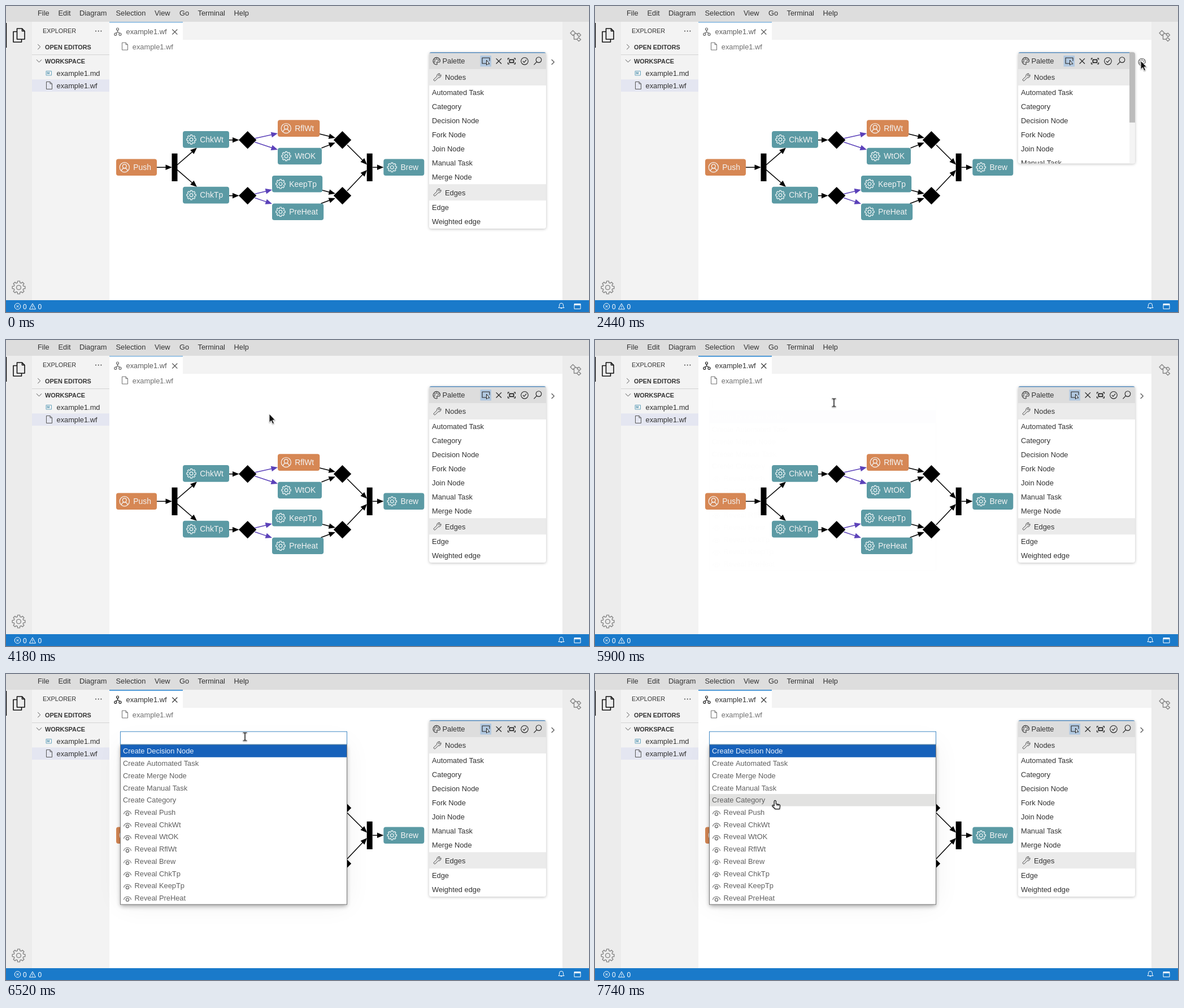
Animation, 1032 px wide and 543 px high, one loop 8 s. Source, as an HTML page with a canvas:

```html
<!DOCTYPE html>
<html lang="en">
<head>
<meta charset="utf-8">
<title>Workflow editor</title>
<style>
html, body { margin: 0; width: 100%; height: 100%; overflow: hidden; background: #fff; }
canvas { display: block; width: 100vw; height: 100vh; }
</style>
</head>
<body>
<canvas id="stage" width="1032" height="543"></canvas>
<script>
const W = 1032, H = 543, LOOP = 8000;
const stage = document.getElementById('stage');
const overlay = document.createElement('canvas');
overlay.width = W; overlay.height = H;
const screenCtx = stage.getContext('2d'), overlayCtx = overlay.getContext('2d');
let ctx = screenCtx;

const FONT = '"Liberation Sans", Arial, sans-serif';
const INK = '#333', TEAL = '#5b9aa4', ORANGE = '#d68754', PURPLE = '#5b41b9';

// ---------- drawing helpers ----------
function text(str, x, y, color = INK, size = 12.83, weight = '') {
  ctx.font = `${weight} ${size}px ${FONT}`;
  ctx.fillStyle = color;
  ctx.fillText(str, x, y + size * 0.355);
}
function rect(x, y, w, h, color) {
  ctx.fillStyle = color;
  ctx.fillRect(x, y, w, h);
}
function box(x, y, w, h, color, lw = 1) {
  ctx.strokeStyle = color; ctx.lineWidth = lw;
  ctx.strokeRect(x, y, w, h);
}
function icon(d, x, y, color, lw = 1, fill) {
  const path = new Path2D(d);
  ctx.save();
  ctx.translate(x, y);
  ctx.lineJoin = 'round';
  if (fill) { ctx.fillStyle = fill; ctx.fill(path); }
  if (lw) { ctx.strokeStyle = color; ctx.lineWidth = lw; ctx.stroke(path); }
  ctx.restore();
}
function circle(x, y, r, color, lw = 1, fill) {
  ctx.beginPath();
  ctx.arc(x, y, r, 0, Math.PI * 2);
  if (fill) { ctx.fillStyle = fill; ctx.fill(); }
  if (lw) { ctx.strokeStyle = color; ctx.lineWidth = lw; ctx.stroke(); }
}
function roundRect(x, y, w, h, r, color) {
  ctx.beginPath();
  ctx.roundRect(x, y, w, h, r);
  ctx.fillStyle = color;
  ctx.fill();
}
function gear(cx, cy, r, color, lw) {
  ctx.beginPath();
  for (let i = 0; i < 8; i++) {
    for (const [offset, k] of [[-.27, .76], [-.17, 1], [.17, 1], [.27, .76]]) {
      const a = i * Math.PI / 4 + offset;
      ctx.lineTo(cx + Math.cos(a) * r * k, cy + Math.sin(a) * r * k);
    }
  }
  ctx.closePath();
  ctx.strokeStyle = color; ctx.lineWidth = lw; ctx.lineJoin = 'round';
  ctx.stroke();
  circle(cx, cy, r * .34, color, lw);
}
function person(cx, cy, color) {
  circle(cx, cy, 8.6, color, 1.2);
  circle(cx, cy - 2, 3.4, color, 1.2);
  icon('M-5.4 6.4C-4.8 3-2.6 1.5 0 1.5S4.8 3 5.4 6.4', cx, cy, color, 1.2);
}
function arrow(x1, y1, x2, y2, color = '#000') {
  const a = Math.atan2(y2 - y1, x2 - x1);
  ctx.save();
  ctx.translate(x2, y2);
  ctx.rotate(a);
  ctx.strokeStyle = ctx.fillStyle = color;
  ctx.lineWidth = 1.5;
  ctx.beginPath();
  ctx.moveTo(-Math.hypot(x2 - x1, y2 - y1), 0);
  ctx.lineTo(-8, 0);
  ctx.stroke();
  ctx.beginPath();
  ctx.moveTo(0, 0); ctx.lineTo(-11.5, -4.8); ctx.lineTo(-11.5, 4.8);
  ctx.fill();
  ctx.restore();
}
const PAGE = 'M-5 -6.5H1.5L5 -3V6.5H-5ZM1.5 -6.5V-3H5';
const CHEVRON = 'M-2.3 -4.5L2.3 0L-2.3 4.5';
const CROSS = 'M-4.5 -4.5L4.5 4.5M4.5 -4.5L-4.5 4.5';
const WRENCH = 'M-6.2 3.6L-.6 -1.8A4 4 0 0 1 4.6 -6.4L2 -3.6L3.4 -2L6.2 -4.8A4 4 0 0 1 1.6 .6L-4 6.2A1.9 1.9 0 0 1 -6.2 3.6Z';

function paletteIcon(x, y, color) {
  icon('M0 6.3A6.3 6.3 0 1 1 6.5 -.5C6.5 2 4.5 2.4 2.5 1.8C.5 1.4 .2 2.8 1 4C1.6 5 1.2 6.3 0 6.3Z', x, y, color, 1.1);
  for (const [dx, dy] of [[-3.4, 1.4], [-2.8, -2.1], [.4, -3.7], [3.4, -1.6]])
    circle(x + dx, y + dy, 1, color, .8);
}

// ---------- workbench ----------
function drawWorkbench(active) {
  rect(0, 0, W, H, '#fff');
  rect(0, 28, 46, 494, '#ececec');
  rect(46, 28, 137, 494, '#f3f3f3');
  rect(183, 28, 802, 32, '#f3f3f3');
  rect(985, 28, 47, 494, '#ececec');
  rect(0, 0, W, 28, '#ddd');
  [['File', 56], ['Edit', 92.5], ['Diagram', 130], ['Selection', 194.5], ['View', 263],
   ['Go', 307], ['Terminal', 339.5], ['Help', 403.5]].forEach(([s, x]) => text(s, x, 12.8));

  rect(0, 30, 1.2, 44, '#000');
  icon('M-3 -12H6L10.5 -7.5V7H-3ZM6 -12V-7.5H10.5M-3 -6.5H-9.5V12H5V7', 22.5, 52, '#111', 1.6);
  gear(22.5, 499.5, 11.5, '#858585', 1.4);
  icon('M-9 -5L-4.5 -9.5L0 -5L-4.5 -.5ZM3 -2L6 -5L9.5 -1.5L6.5 1.5ZM2.5 6L5.5 3L9.5 6.5L6 9.5ZM-1 -4H4M-2.5 -2.5V6H2.5', 1008, 53, '#858585', 1.4);

  text('EXPLORER', 65, 44.5, INK, 10.86);
  for (const x of [159, 163.7, 168.4]) circle(x, 44.5, 1, '', 0, '#444');
  icon(CHEVRON, 58.5, 72.5, '#555');
  text('OPEN EDITORS', 69, 73, INK, 10.86, 'bold');
  rect(46, 86, 137, 1, '#d3d3d3');
  icon('M-4.5 -2.3L0 2.3L4.5 -2.3', 58.5, 97.5, '#555');
  text('WORKSPACE', 69, 98, INK, 10.86, 'bold');
  rect(46, 130.4, 137, 21.7, '#e4e6f1');
  box(71, 115.5, 9.5, 7.5, '#6ba6bf', 1);
  text('M', 72.2, 119.3, '#3f8aa9', 6, 'bold');
  text('example1.md', 89.5, 119);
  icon(PAGE, 76.5, 141, '#555');
  text('example1.wf', 89.5, 141);

  rect(183, 28, 130, 32, '#fff');
  rect(183, 28, 130, 1.6, active ? '#2583cf' : '#85b7e0');
  const tint = active ? '#222' : '#666';
  circle(197.5, 41, 2, tint, 1.2);
  circle(193.8, 50.2, 2, tint, 1.2);
  circle(202, 50.2, 2, tint, 1.2);
  icon('M0 -2.5V.5L-3 2.7M0 .5L3.6 2.7', 197.6, 45.5, tint, 1.2);
  text('example1.wf', 212.5, 45.3, active ? INK : '#5f5f5f');
  icon(CROSS, 298.8, 46, active ? '#333' : '#555', 1.1);
  icon(PAGE, 210.5, 71.5, '#707070');
  text('example1.wf', 223.8, 72, '#707070');

  rect(0, 522, W, 21, '#1a7aca');
  circle(20.5, 533, 5.3, '#fff');
  icon('M-2 -2L2 2M2 -2L-2 2', 20.5, 533, '#fff');
  text('0', 30, 533.3, '#fff', 12);
  icon('M0 -5L5.5 5H-5.5ZM0 -1.5V1.8M0 2.8V4', 47, 533, '#fff');
  text('0', 56.5, 533.3, '#fff', 12);
  icon('M-5 3.2L-3.5 1V-1.5A3.5 3.5 0 0 1 3.5 -1.5V1L5 3.2ZM-1.3 3.6A1.4 1.4 0 0 0 1.3 3.6', 983, 532.3, '#fff');
  box(1006, 528.5, 11, 9, '#fff');
  rect(1006, 528.5, 11, 2.6, '#fff');
}

// ---------- diagram ----------
const NODES = [
  ['Push', 195, 271.5, 72, true], ['ChkWt', 313, 222.1, 82], ['ChkTp', 313, 320.8, 82],
  ['RflWt', 481, 202.3, 74.3, true], ['WtOK', 481, 251.7, 78], ['KeepTp', 471, 301, 89.2],
  ['PreHeat', 471, 350.4, 91.2], ['Brew', 668.3, 271.5, 72]
];
function drawDiagram() {
  arrow(267, 286.3, 294, 286.3);
  arrow(303, 282, 338, 251.6);
  arrow(303, 290.6, 338, 321);
  for (const y of [237.8, 336.6]) {
    arrow(395, y, 412.5, y);
    icon('M0 -15.7L15.7 0L0 15.7L-15.7 0Z', 427.7, y, '', 0, '#000');
    icon('M0 -15.7L15.7 0L0 15.7L-15.7 0Z', 595.5, y, '', 0, '#000');
  }
  arrow(440.5, 235, 481, 226, PURPLE);
  arrow(440.5, 241.5, 481, 255, PURPLE);
  arrow(440.5, 333.5, 471, 326, PURPLE);
  arrow(440.5, 340.5, 471, 351, PURPLE);
  arrow(555, 227, 583, 234);
  arrow(558.5, 252, 583, 242.5);
  arrow(560, 327, 583, 333);
  arrow(557.5, 350.5, 583, 341);
  arrow(604, 246.5, 639, 281.5);
  arrow(604, 328, 639, 291);
  arrow(649, 286.3, 668.5, 286.3);
  rect(293.5, 261.7, 10, 49.3, '#000');
  rect(638.7, 261.7, 10, 49.3, '#000');
  for (const [label, x, y, w, manual] of NODES) {
    roundRect(x, y, w, 29.6, 4, manual ? ORANGE : TEAL);
    if (manual) person(x + 14.8, y + 14.8, '#f5f5f5');
    else gear(x + 15, y + 14.8, 8.3, '#f0f6f7', 1.2);
    text(label, x + 30.2, y + 14.6, '#f3f3f3', 13.9);
  }
}

// ---------- tool palette ----------
const FULL = 313;
const ITEMS = ['Automated Task', 'Category', 'Decision Node', 'Fork Node', 'Join Node', 'Manual Task', 'Merge Node'];

function drawPalette(height, pointer) {
  if (height <= 0.5) return;
  const scrolling = height < FULL, right = scrolling ? 946 : 956, w = right - 749;
  ctx.save();
  ctx.shadowColor = 'rgba(0,0,0,.25)';
  ctx.shadowBlur = 5;
  ctx.shadowOffsetY = 1;
  roundRect(749, 82, 207, height, 4, '#fff');
  ctx.restore();
  ctx.save();
  ctx.beginPath();
  ctx.roundRect(749, 82, 207, height, 4);
  ctx.clip();
  rect(749, 82, w, 30, '#ddd');
  rect(749, 82, w, 1.4, '#4d88bd');
  paletteIcon(762, 97.7, '#333');
  text('Palette', 772.5, 97.8);

  const x = right - 956;
  rect(x + 839.5, 88, 19.5, 19.5, '#b1c8e0');
  icon('M1 4.5H-6.5V-5.5H6.5V0', x + 849.5, 97.5, '#222', 1.1);
  icon('M0 -1.5V7.5L2.2 5.3H5.5Z', x + 850.5, 97.5, '#222', 1, '#dce6f0');
  icon('M-4.7 -4.7L4.7 4.7M4.7 -4.7L-4.7 4.7', x + 872.3, 97.8, '#222', 1.2);
  icon('M-6.5 -2.2V-5H-4M4 -5H6.5V-2.2M6.5 2.2V5H4M-4 5H-6.5V2.2', x + 895, 97.8, '#222', 1.2);
  box(x + 891.4, 95.3, 7.2, 5, '#222', 1.7);
  circle(x + 918, 97.8, 6.3, '#222', 1.1);
  icon('M-3 .2L-.8 2.4L3.2 -2.4', x + 918, 97.8, '#222', 1.1);
  circle(x + 943, 95.6, 4.8, '#222', 1.1);
  icon('M-3.5 3.5L-8.5 8.7', x + 943, 95.6, '#222', 1.2);

  [['Nodes', 112], ['Edges', 316.2]].forEach(([label, y]) => {
    rect(749, y, w, 29, '#ebebeb');
    icon(WRENCH, 763.5, y + 14.6, '#444');
    text(label, 777, y + 14.8);
  });
  const row = (label, y) => {
    if (pointer && Math.abs(pointer.y - y) < 12.5 && pointer.x > 749 && pointer.x < right)
      rect(749, y - 12.5, w, 25, '#e4e4e4');
    text(label, 754, y);
  };
  ITEMS.forEach((label, i) => row(label, 153.5 + i * 25.05));
  row('Edge', 357.3);
  row('Weighted edge', 382.6);
  if (scrolling) {
    rect(946, 82, 10, height, '#f4f4f4');
    rect(946, 82, 10, height * height / FULL, '#bcbcbc');
  }
  ctx.restore();
}

// ---------- command palette ----------
const COMMANDS = ['Decision Node', 'Automated Task', 'Merge Node', 'Manual Task', 'Category'].map(s => 'Create ' + s);
const TARGETS = ['Push', 'ChkWt', 'WtOK', 'RflWt', 'Brew', 'ChkTp', 'KeepTp', 'PreHeat'].map(s => 'Reveal ' + s);
const ROW = 21.72, LIST_TOP = 126;

function drawCommands(pointer, caret) {
  ctx.clearRect(0, 0, W, H);
  ctx.save();
  ctx.shadowColor = 'rgba(0,0,0,.06)';
  ctx.shadowBlur = 45;
  rect(203, 125, 400, 284, '#fff');
  ctx.shadowColor = 'rgba(0,0,0,.35)';
  ctx.shadowBlur = 8;
  ctx.shadowOffsetY = 3;
  rect(203, 125, 400, 284, '#fff');
  ctx.restore();
  rect(202, 101.5, 402, 24, '#fff');
  const hovered = pointer.y > LIST_TOP ? Math.floor((pointer.y - LIST_TOP) / ROW) : -1;
  [...COMMANDS, ...TARGETS].forEach((label, i) => {
    const y = LIST_TOP + i * ROW, reveal = i >= COMMANDS.length;
    if (i === 0) rect(203, y, 400, ROW, '#1661ba');
    else if (i === hovered) rect(203, y, 400, ROW, '#e2e2e1');
    text(label, reveal ? 227.5 : 207, y + 10.9, i ? '#606060' : '#e6eefa');
    if (reveal) {
      icon('M-6.5 3.5A6.6 6.6 0 0 1 6.5 3.5', 215, y + 10.5, '#555', 1.1);
      circle(215, y + 14, 2.6, '#555', 1.1);
    }
  });
  box(202.5, 125.5, 401, 283.5, '#777');
  box(202.5, 102.2, 401, 22.8, '#4189c4');
  if (caret) rect(207, 107, 1, 14, '#333');
}

// ---------- pointer ----------
const PATH = [
  [400, 56, 486], [680, 620, 270], [920, 980, 93], [1160, 896, 131], [1260, 896, 131],
  [1480, 892, 154], [1860, 966, 97], [3860, 966, 97], [4180, 466, 131], [4380, 434, 122],
  [4520, 434, 122], [4820, 423, 111], [6860, 423, 111], [7480, 319, 225], [LOOP, 319, 225]
];
function pointerAt(t) {
  if (t < PATH[0][0]) return null;
  const i = PATH.findIndex(p => p[0] > t);
  const [t0, x0, y0] = PATH[i - 1], [t1, x1, y1] = PATH[i];
  const u = (t - t0) / (t1 - t0), k = u * u * (3 - 2 * u);
  return { x: x0 + (x1 - x0) * k, y: y0 + (y1 - y0) * k };
}
function drawPointer({ x, y }, t) {
  ctx.save();
  ctx.shadowColor = 'rgba(0,0,0,.3)';
  ctx.shadowBlur = 2;
  ctx.shadowOffsetY = 1;
  if (t < 5900) {
    icon('M0 0V15.5L3.5 12.2L6 18L8.6 16.9L6.1 11.2H10.6Z', x, y, '#fff', 1, '#111');
  } else if (y < LIST_TOP) {
    const beam = 'M-3.5 -7H-1.2L0 -6L1.2 -7H3.5M0 -6V6M-3.5 7H-1.2L0 6L1.2 7H3.5';
    icon(beam, x, y, '#fff', 2.6);
    icon(beam, x, y, '#111', 1.2);
  } else {
    icon('M-1.8 9V1A1.6 1.6 0 0 1 1.4 1V5.5L7 6.6Q8.8 7 8.6 9L7.8 14.5H.2L-5 9.5Q-5.6 7.4 -3.5 7.6ZM3.2 6V8.5M5.8 6.6V8.8',
      x, y, '#111', 1.1, '#fff');
  }
  ctx.restore();
}

// ---------- timing ----------
const bezier = (a, b, s) => 3 * (1 - s) * (1 - s) * s * a + 3 * (1 - s) * s * s * b + s * s * s;
function ease(u) {
  if (u <= 0) return 0;
  if (u >= 1) return 1;
  let lo = 0, hi = 1;
  for (let i = 0; i < 20; i++) {
    const mid = (lo + hi) / 2;
    if (bezier(.25, .25, mid) < u) lo = mid; else hi = mid;
  }
  return bezier(.1, 1, lo);
}
function paletteHeight(t) {
  const limit = t < 3300 ? 500 * (1 - ease((t - 2371) / 200)) : 500 * ease((t - 3310) / 200);
  return Math.min(FULL, limit);
}

function draw(t) {
  const pointer = pointerAt(t);
  drawWorkbench(t >= 4600);
  drawDiagram();
  if (t >= 2360 && t < 3300) paletteIcon(968, 99.5, '#555');
  else icon(CHEVRON, 968, 99.5, '#555', 1.2);
  drawPalette(paletteHeight(t), pointer);
  if (t > 5900) {
    const caret = t < 6520 || (t >= 7130 && t < 7740);
    ctx = overlayCtx;
    drawCommands(pointer, caret);
    ctx = screenCtx;
    ctx.globalAlpha = Math.min(1, (t - 5900) / 310);
    ctx.drawImage(overlay, 0, 0);
    ctx.globalAlpha = 1;
  }
  if (pointer) drawPointer(pointer, t);
}

function tick() {
  draw(performance.now() % LOOP);
  requestAnimationFrame(tick);
}
tick();
</script>
</body>
</html>
```
